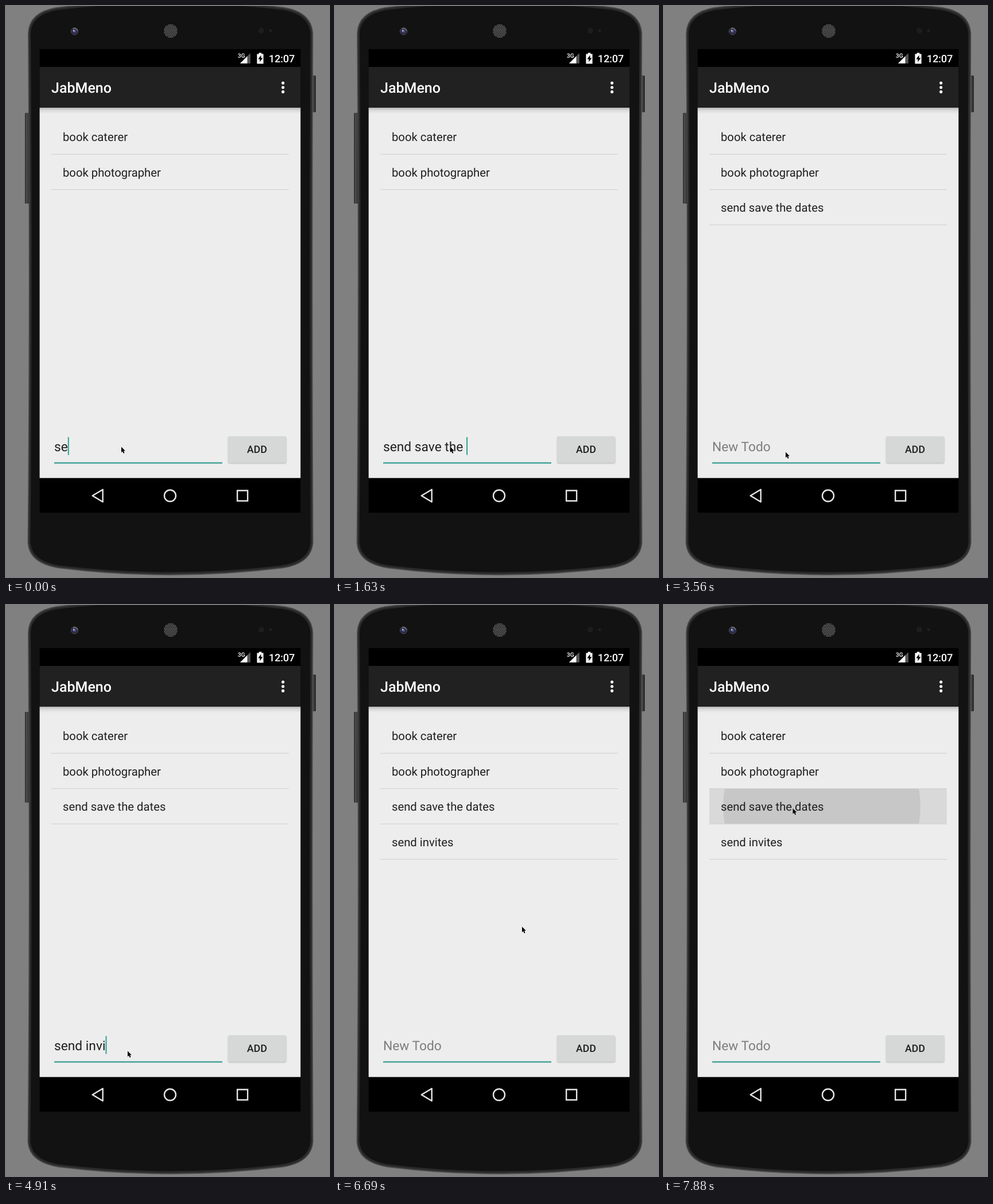
An HTML page that plays this animation: 563 px wide and 994 px high, repeating every 8 s.

```html
<!DOCTYPE html>
<html lang="en">
<head>
<meta charset="utf-8">
<title>To-do list</title>
<style>
  html, body { margin: 0; width: 100%; height: 100%; overflow: hidden; background: #808080; }
  svg { display: block; width: 563px; height: 994px; }
  text { font-family: Roboto, "Noto Sans", sans-serif; fill: #1f1f1f; white-space: pre; text-rendering: geometricPrecision; }
  .medium { font-weight: 500; }
  .white { fill: #fff; }
</style>
</head>
<body>
<svg viewBox="0 0 563 994">
  <defs>
    <linearGradient id="barShadow" x2="0" y2="1">
      <stop offset="0" stop-color="#000" stop-opacity=".24"/>
      <stop offset=".4" stop-color="#000" stop-opacity=".08"/>
      <stop offset="1" stop-color="#000" stop-opacity="0"/>
    </linearGradient>
    <linearGradient id="sideKey">
      <stop offset="0" stop-color="#2a2a2a"/>
      <stop offset=".4" stop-color="#505050"/>
      <stop offset="1" stop-color="#1c1c1c"/>
    </linearGradient>
    <radialGradient id="lens">
      <stop offset="0" stop-color="#6a68a8"/>
      <stop offset=".55" stop-color="#303058"/>
      <stop offset="1" stop-color="#15151f"/>
    </radialGradient>
    <filter id="soft" x="-10%" y="-20%" width="120%" height="150%"><feGaussianBlur stdDeviation=".9"/></filter>
    <clipPath id="rowClip"><rect x="79" y="319.5" width="414" height="61.5"/></clipPath>
  </defs>

  <!-- phone -->
  <rect x="33" y="186" width="8" height="158" rx="1.5" fill="url(#sideKey)"/>
  <rect x="532" y="121" width="8" height="64" rx="1.5" fill="url(#sideKey)"/>
  <path d="M39 48C40 22 58 8 88 3Q286-21 485 3C515 8 533 22 534.500 48Q532.500 495 534.800 934C533 960 514 973 482 978Q286 1002 92 978C60 973 40 960 38.500 934Q42.500 495 39 48Z" fill="#2a2a2a" stroke="#484848" stroke-width="1.8"/>
  <path d="M43 48C44 25 61 12 90 7Q286-17 483 7C512 12 529 25 530.500 48Q528.500 495 530.800 933C529 957 511 969 480 974Q286 997 94 974C63 969 44 957 42.500 933Q46.500 495 43 48Z" fill="#121212"/>
  <circle cx="119.500" cy="44" r="6" fill="url(#lens)" stroke="#5c5c5c"/>
  <path d="M117 39.200A5.500 5.500 0 0 1 124.500 43" fill="none" stroke="#a5a5a5"/>
  <circle cx="118" cy="43" r="1.400" fill="#b9b8e0"/>
  <circle cx="287" cy="43.500" r="12" fill="#2a2a2a"/>
  <g id="speaker" fill="#747474"></g>
  <circle cx="445" cy="43" r="5" fill="#1d1d1d"/>
  <circle cx="461" cy="43" r="2.500" fill="#202020"/>

  <!-- screen -->
  <rect x="58.600" y="75" width="454.800" height="807"/>
  <rect x="58.600" y="177" width="454.800" height="644.700" fill="#ededed"/>
  <rect x="58.600" y="177" width="454.800" height="11" fill="url(#barShadow)"/>
  <rect x="58.600" y="106" width="454.800" height="71" fill="#212121"/>
  <path d="M426 82V100H408Z" fill="#555"/>
  <path d="M420.500 87.500V100H408Z" fill="#fff"/>
  <text class="medium white" x="404" y="90" font-size="10.200">3G</text>
  <path d="M437.500 83.500h3.300v-2h4.600v2h3.300V100.500h-11.200Z" fill="#fff"/>
  <path d="M444.600 85.500l-5.200 7h3v5l5.200-7h-3Z"/>
  <text class="medium white" x="458" y="97.500" font-size="17.930">12:07</text>
  <text class="medium white" x="79" y="151" font-size="25">JabMeno</text>
  <g class="white"><circle cx="482.800" cy="134" r="2.560"/><circle cx="482.800" cy="141.700" r="2.560"/><circle cx="482.800" cy="149.400" r="2.560"/></g>
  <g fill="none" stroke="#e6e6e6" stroke-width="2.400" stroke-linejoin="round">
    <path d="M150.700 852.500L168.700 841.700V863.300Z"/>
    <circle cx="286" cy="852.500" r="10"/>
    <path d="M403.200 843.500h18v18h-18Z" stroke-linejoin="miter"/>
  </g>

  <!-- list and form -->
  <g id="highlight" clip-path="url(#rowClip)">
    <rect x="79" y="319" width="414" height="62" fill="#d9d9d9"/>
    <circle cx="275" cy="350" r="172" fill="#c7c7c7"/>
  </g>
  <g id="list" font-size="20.250"></g>
  <text id="field" x="84" y="775" font-size="22.750"></text>
  <rect x="84" y="794.200" width="293" height="2.500" fill="#47a59a"/>
  <rect id="caret" y="750.500" width="2" height="31" fill="#2ba396"/>
  <rect id="shadow" x="387" y="750.500" width="101.500" height="46" rx="2.500" filter="url(#soft)"/>
  <rect id="button" x="387" y="749" width="101.200" height="46" rx="2.500"/>
  <text class="medium" x="437.500" y="778.200" font-size="17.750" text-anchor="middle">ADD</text>
  <path id="pointer" d="M0 0V9.700L2.200 7.700L3.800 11.400L5.500 10.600L4 7.100H6.900Z" stroke="#fff" stroke-opacity=".6" stroke-width=".8" paint-order="stroke"/>
</svg>
<script>
const LOOP = 8000;
const ROW = 61.5;
const ITEMS = ["book caterer", "book photographer", "send save the dates", "send invites"];
const BUTTON = ["#d6d8d7", "#bfc1c0", "#abadac"];
const $ = id => document.getElementById(id);

function add(parent, tag, attrs, text = "") {
  const node = document.createElementNS("http://www.w3.org/2000/svg", tag);
  for (const key in attrs) node.setAttribute(key, attrs[key]);
  node.textContent = text;
  return parent.appendChild(node);
}

for (let row = -4; row <= 4; row++) {
  for (let col = -4; col <= 4; col++) {
    const x = (col + (row & 1) / 2) * 3, y = row * 2.6;
    if (Math.hypot(x, y) < 11.3) add($("speaker"), "circle", { cx: 287 + x, cy: 43.5 + y, r: 0.9 });
  }
}

const rows = ITEMS.map((label, i) => {
  const row = add($("list"), "g", {});
  add(row, "text", { x: 99, y: 235 + i * ROW }, label);
  add(row, "rect", { x: 79, y: 257.5 + i * ROW, width: 414, height: 1.2, fill: "#d3d3d3" });
  return row;
});

// Each step overrides part of the state before it.
const at = (x, y) => ({ x, y });
const type = text => ({ text, caret: true });
const STEPS = [
  [0, { ...type("se"), ...at(201, 767.5), press: 0, items: 2, selected: false }],
  [300, type("sen")],
  [445, type("send")],
  [590, type("send ")],
  [890, type("send s")],
  [1039, type("send sav")],
  [1187, type("send save")],
  [1336, type("send save t")],
  [1484, type("send save the")],
  [1630, type("send save the ")],
  [1782, type("send save the d")],
  [1930, type("send save the dat")],
  [2080, type("send save the dates")],
  [2370, at(210, 770)],
  [2519, at(282, 781)],
  [2667, { ...at(388, 786), caret: false }],
  [2816, at(430, 782)],
  [2965, { press: 1 }],
  [3113, { ...type(""), press: 2, items: 3 }],
  [3261, { ...at(330, 796), press: 1 }],
  [3410, { ...at(212, 776.5), press: 0 }],
  [3560, { caret: false }],
  [3860, type("se")],
  [4460, type("send")],
  [4610, type("send i")],
  [4760, type("send in")],
  [4910, type("send invi")],
  [5060, type("send invites")],
  [5500, at(228, 776)],
  [5649, { ...at(315, 774), caret: false }],
  [5797, at(402, 773)],
  [5946, at(426, 772.5)],
  [6094, { press: 1, caret: true }],
  [6240, { ...type(""), press: 2, items: 4 }],
  [6391, { press: 1 }],
  [6540, { ...at(372, 690), press: 0 }],
  [6690, { ...at(326, 560), caret: false }],
  [6837, at(283, 455)],
  [6985, at(248, 392)],
  [7132, at(230, 363)],
  [7280, { ...at(224.5, 354), caret: true }],
  [7730, { caret: false }],
  [7880, { selected: true }]
];

const show = (node, visible) => node.setAttribute("visibility", visible ? "visible" : "hidden");

function render(time) {
  const state = {};
  for (const [start, change] of STEPS) if (start <= time) Object.assign(state, change);

  const field = $("field");
  field.textContent = state.text || "New Todo";
  field.style.fill = state.text ? "#1f1f1f" : "#7d7d7d";
  $("caret").setAttribute("x", 84 + (state.text ? field.getComputedTextLength() : 0));
  show($("caret"), state.caret);
  show($("highlight"), state.selected);
  rows.forEach((row, i) => show(row, i < state.items));
  $("button").setAttribute("fill", BUTTON[state.press]);
  $("shadow").setAttribute("opacity", state.press ? 0.35 : 0.2);
  $("pointer").setAttribute("transform", `translate(${state.x} ${state.y})`);
}

function frame() {
  render(performance.now() % LOOP);
  requestAnimationFrame(frame);
}
frame();
</script>
</body>
</html>
```
